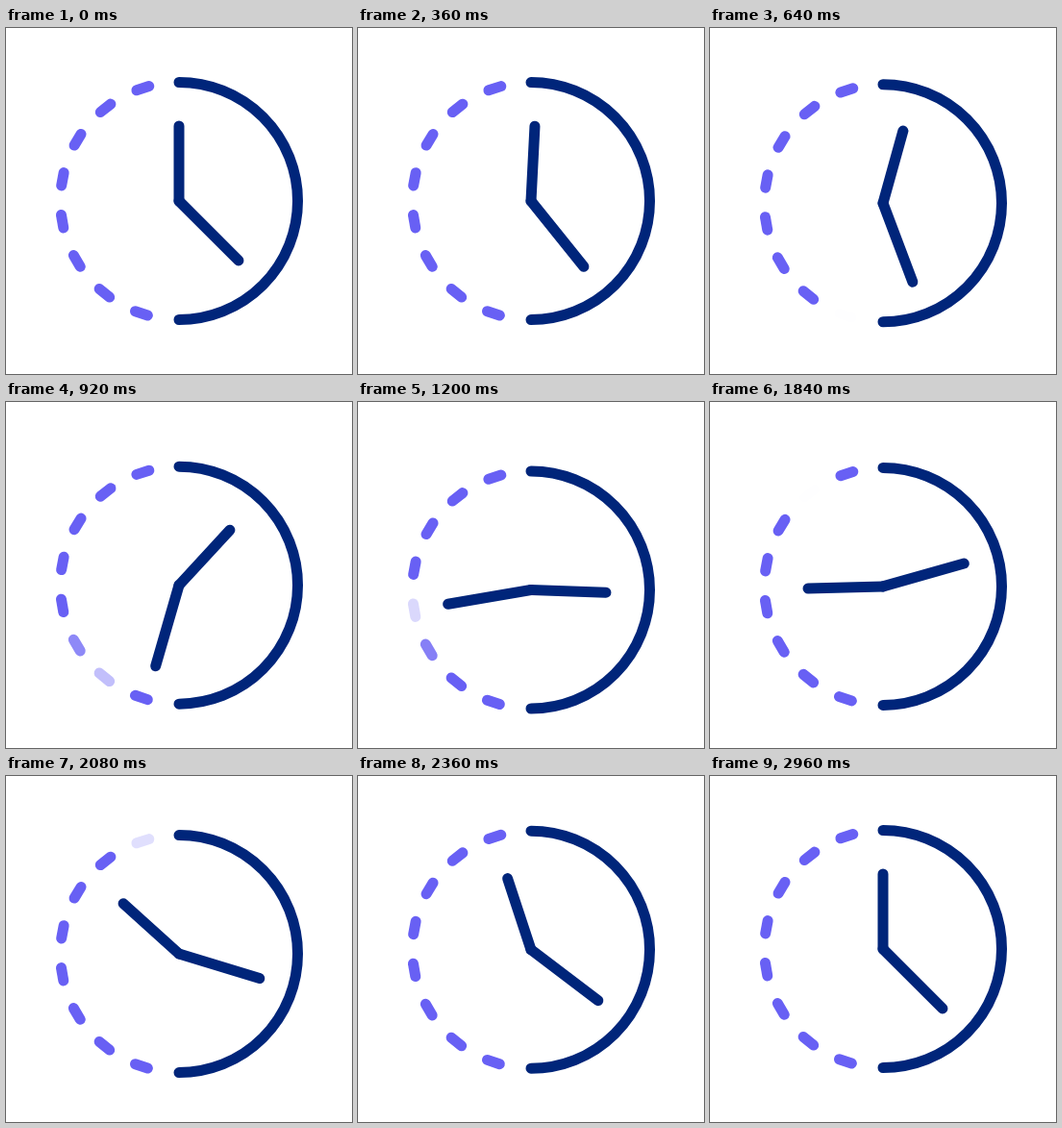
Write an HTML page that moves like this. It is 360 px wide and 360 px high and loops after 3000 ms.

```html
<!DOCTYPE html>
<html lang="en">
<head>
<meta charset="utf-8">
<title>Clock</title>
<style>
  html, body { margin: 0; height: 100%; overflow: hidden; background: #fff; }
  svg { display: block; width: 100%; height: 100%; }
  path { fill: none; stroke: #00257a; stroke-width: 11; stroke-linecap: round; }
  .dash { stroke: #6860f4; }
</style>
</head>
<body>
<svg viewBox="0 0 360 360">
  <g id="clock">
    <path d="M180 56.5a123.5 123.5 0 0 1 0 247"/>
    <path id="hour" d="M180 180v-78"/>
    <path id="minute" d="M180 180v-87.6"/>
  </g>
</svg>
<script>
const LOOP = 3000, RADIUS = 123.4;
const clock = document.getElementById('clock');
const hour = document.getElementById('hour');
const minute = document.getElementById('minute');

const clamp = v => Math.min(1, Math.max(0, v));

// cubic-bezier(.58, 0, .42, 1), solved by bisection
function ease(x) {
  let lo = 0, hi = 1;
  for (let i = 0; i < 24; i++) {
    const s = (lo + hi) / 2, r = 1 - s;
    if (1.74 * s * r * r + 1.26 * s * s * r + s ** 3 < x) lo = s; else hi = s;
  }
  return lo * lo * (3 - 2 * lo);
}
const tween = (t, from, to) => ease(clamp((t - from) / (to - from)));

// Angles run clockwise from the bottom of the dial
function point(deg) {
  const a = deg * Math.PI / 180;
  return `${180 - RADIUS * Math.sin(a)} ${180 + RADIUS * Math.cos(a)}`;
}

const dashes = Array.from({ length: 8 }, (_, i) => {
  const dash = document.createElementNS('http://www.w3.org/2000/svg', 'path');
  const mid = 18.5 + 20.53 * i;
  dash.setAttribute('d', `M${point(mid - 3.15)}L${point(mid + 3.15)}`);
  dash.setAttribute('class', 'dash');
  return clock.appendChild(dash);
});

function draw(now) {
  const t = now % LOOP;
  const drop = 16 * (tween(t, 320, 1370) - tween(t, 1370, 2590));
  clock.setAttribute('transform', `translate(0 ${drop})`);
  hour.setAttribute('transform', `rotate(${360 * tween(t, 120, 2920)} 180 180)`);
  minute.setAttribute('transform', `rotate(${135 + 360 * tween(t, 30, 2730)} 180 180)`);
  dashes.forEach((dash, i) => {
    const dt = t - 640 - 200 * i;
    dash.setAttribute('opacity', clamp(dt < 0 ? -dt / 160 : dt / 200));
  });
}

const start = performance.now();
function tick() {
  draw(performance.now() - start);
  requestAnimationFrame(tick);
}
tick();
</script>
</body>
</html>
```
